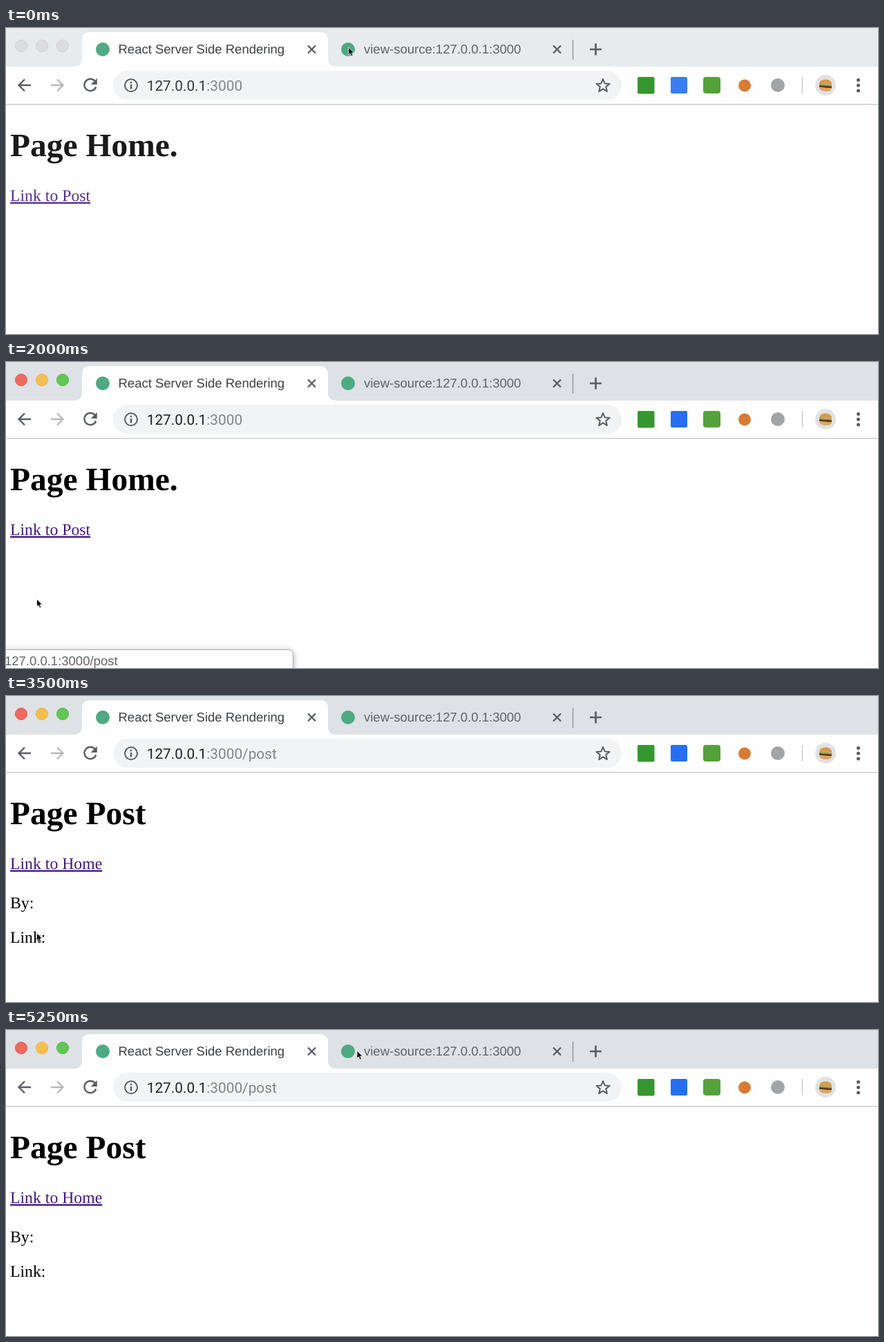
Animation of 1262 by 444 pixels, one loop 5500 ms. Source, as an HTML page:

```html
<!DOCTYPE html>
<html lang="en">
<head>
<meta charset="utf-8">
<title>Server side rendering demo</title>
<style>
  html, body { margin: 0; width: 100%; height: 100%; overflow: hidden; background: #fefefe; }
  svg { display: block; width: 1262px; height: 444px; text-rendering: geometricPrecision; }
  .ui { font: 18.5px "Liberation Sans", Arial, sans-serif; }
  .url { font: 20.8px Roboto, "Liberation Sans", sans-serif; }
  .page { font: 23.75px "Liberation Serif", "Times New Roman", serif; }
  .page .title { font-size: 47.5px; font-weight: bold; }
  .line { fill: none; stroke: #5a5e63; stroke-width: 2.4; }
</style>
</head>
<body>
<svg viewBox="0 0 1262 444">
  <defs>
    <filter id="shadow" x="-10%" y="-50%" width="120%" height="220%">
      <feDropShadow dx="0" dy="2" stdDeviation="5" flood-color="#000" flood-opacity=".3"/>
    </filter>
    <path id="cross" class="line" d="M-5.5-5.5 5.5 5.5M5.5-5.5-5.5 5.5"/>
    <path id="arrow" class="line" d="M9 0H-8M0-8.5-8.5 0 0 8.5"/>
  </defs>

  <rect width="1262" height="444" fill="#fefefe"/>
  <rect id="strip" width="1262" height="56"/>
  <path d="M98 56Q110 56 110 44V18Q110 6 122 6H454Q466 6 466 18V44Q466 56 478 56Z" fill="#fefefe"/>
  <g id="lights" stroke-width="1">
    <circle cx="22" cy="26" r="8.6"/>
    <circle cx="52" cy="26" r="8.6"/>
    <circle cx="82" cy="26" r="8.6"/>
  </g>

  <g class="ui">
    <circle id="icon" cx="140" cy="31" r="10" fill="#4fa982"/>
    <path id="spinner" fill="none" stroke="#7d80c4" stroke-width="2.6"/>
    <text id="tabTitle" x="162.5" y="37.3" fill="#3c4043"/>
    <circle cx="495" cy="31" r="10" fill="#4fa982"/>
    <text x="518" y="37.3" fill="#5f6368">view-source:127.0.0.1:3000</text>
  </g>
  <use href="#cross" x="442.5" y="31"/>
  <use href="#cross" x="797.5" y="31"/>
  <path d="M820.5 17V46" stroke="#95999e" stroke-width="1.5"/>
  <path class="line" d="M845 31H862M853.5 22.5V39.5" style="stroke-width:2.7"/>

  <path d="M0 110.8H1262" stroke="#d3d4d6" stroke-width="1.8"/>
  <use href="#arrow" x="27" y="83"/>
  <use href="#arrow" transform="translate(74 83) scale(-1 1)" opacity=".42"/>
  <g id="reload">
    <path class="line" d="M129 77.5A8.6 8.6 0 1 0 130.2 85.5"/>
    <path d="M131.8 73V82H122.8Z" fill="#5a5e63"/>
  </g>
  <path id="stop" class="line" d="M113.5 75 130 91.5M130 75 113.5 91.5"/>
  <rect x="155" y="62" width="736" height="42" rx="21" fill="#f1f3f5"/>
  <circle class="line" cx="181" cy="83.3" r="9" style="stroke-width:2"/>
  <path class="line" d="M181 82V88.5M181 77.8V80.2"/>
  <text class="url" x="203.7" y="90.6"><tspan id="host">127.0.0.1</tspan><tspan id="path" fill="#80858a"></tspan></text>
  <path id="star" class="line" stroke-linejoin="round" style="stroke-width:2"/>

  <rect x="914" y="71" width="24.5" height="24.5" rx="2" fill="#36962f"/>
  <rect id="blueIcon" x="962" y="71" width="24" height="24" rx="2"/>
  <rect x="1009" y="71" width="25" height="24" rx="4" fill="#55a13a"/>
  <circle cx="1069" cy="83.5" r="9" fill="#d77b36"/>
  <circle cx="1117" cy="83" r="10" fill="#a2a5a7"/>
  <path d="M1152.5 71V95" stroke="#cfd1d4" stroke-width="1.6"/>
  <circle cx="1186" cy="83" r="15" fill="#e2e2e3"/>
  <path d="M1177 81Q1178 74 1187 74.5Q1195 75 1195 82Z" fill="#d79a4b"/>
  <path d="M1177 82 1195 83.5" stroke="#8ba447" stroke-width="2"/>
  <path d="M1177 84.5 1195 86" stroke="#63391f" stroke-width="3"/>
  <path d="M1177 87H1195Q1195 92 1187 92 1178 92 1177 87Z" fill="#dba85e"/>
  <g fill="#5a5e63">
    <circle cx="1233.5" cy="75.5" r="2.5"/>
    <circle cx="1233.5" cy="83.3" r="2.5"/>
    <circle cx="1233.5" cy="91" r="2.5"/>
  </g>

  <g class="page" id="page">
    <text id="heading" class="title" x="6" y="186"></text>
    <text id="link" x="6" y="250.6" text-decoration="underline"></text>
    <g id="details">
      <text x="6" y="307.6">By:</text>
      <text x="6" y="358">Link:</text>
    </g>
  </g>

  <g id="status">
    <path d="M-4 417.5H409Q415.5 417.5 415.5 424V450H-4Z" fill="#fefefe" stroke="#a9a9a9" filter="url(#shadow)"/>
    <text id="statusText" class="ui" x="-2" y="439.5" fill="#5f6368"></text>
  </g>
  <path id="cursor" d="M0 0V11L2.5 8.7 4.4 13 6.4 12.1 4.6 8H8Z" fill="#000" stroke="#fff" stroke-width=".8"/>
</svg>

<script>
const LOOP = 5500;
const $ = id => document.getElementById(id);
const set = (id, attrs) => Object.entries(attrs).forEach(([k, v]) => $(id).setAttribute(k, v));
const show = (id, on) => set(id, { visibility: on ? 'visible' : 'hidden' });
const write = (id, text) => { if ($(id).textContent !== text) $(id).textContent = text; };

// Pointer stops: [time, x, y]
const pointer = [
  [0, 495.5, 28], [250, 499, 27], [500, 245, 278], [750, 199, 282],
  [1250, 93.5, 319.5], [1500, 50, 341], [1750, 44.5, 344],
  [4000, 50, 349], [4250, 62.5, 351], [4500, 157, 319],
  [4750, 458, 268], [5000, 500, 37], [5250, 508, 30]
];

// Status bubble: [time, text, opacity]
const statuses = [
  [0, '', 0], [2000, '127.0.0.1:3000/post', 1], [3250, '127.0.0.1:3000/post', 0.5],
  [3500, '', 0], [3750, '127.0.0.1:3000', 1], [4500, '', 0]
];

const at = (steps, t) => steps.reduce((last, step) => step[0] <= t ? step : last);

function arc(cx, cy, r, from, to) {
  const point = deg => {
    const a = deg * Math.PI / 180;
    return `${cx + r * Math.cos(a)} ${cy + r * Math.sin(a)}`;
  };
  return `M${point(from)}A${r} ${r} 0 0 1 ${point(to)}`;
}

function starPath(cx, cy, outer, inner) {
  const points = Array.from({ length: 10 }, (_, i) => {
    const a = (i / 5 - 0.5) * Math.PI, r = i % 2 ? inner : outer;
    return `${cx + r * Math.cos(a)} ${cy + r * Math.sin(a)}`;
  });
  return `M${points.join('L')}Z`;
}

function render(t) {
  const fading = t < 250;
  const active = t >= 1000;
  const pressed = t >= 2750 && t < 3000;
  const loading = t >= 3000 && t < 3500;
  const post = t >= 3250;

  set('strip', { fill: active ? '#dee1e6' : '#e7ebee' });
  const colors = active ? ['#ee6a5f', '#f5be50', '#62c655'] : ['#dddddf', '#dddddf', '#dddddf'];
  const edges = active ? ['#e5635a', '#ebb549', '#5abd4f'] : ['#d0d1d3', '#d0d1d3', '#d0d1d3'];
  [...$('lights').children].forEach((light, i) => {
    light.setAttribute('fill', colors[i]);
    light.setAttribute('stroke', edges[i]);
  });

  show('icon', !loading);
  show('spinner', loading);
  show('stop', loading);
  show('reload', !loading);
  set('spinner', { d: post ? arc(140, 31, 9, -60, 30) : arc(142, 31, 8.5, -100, -62) });
  write('tabTitle', loading && !post ? '127.0.0.1:3000/post' : 'React Server Side Rendering');
  write('path', t >= 3000 ? ':3000/post' : ':3000');
  set('host', { fill: fading ? '#34373a' : '#202124' });
  set('blueIcon', { fill: fading ? '#3b7df4' : '#246ff2' });

  set('page', { fill: fading ? '#1a1a1a' : '#000' });
  write('heading', post ? 'Page Post' : 'Page Home.');
  write('link', post ? 'Link to Home' : 'Link to Post');
  set('link', { fill: pressed ? '#ee0000' : fading ? '#55308a' : '#42197c' });
  show('details', post);

  const [, text, opacity] = at(statuses, t);
  write('statusText', text);
  set('status', { opacity });

  const [, x, y] = at(pointer, t);
  set('cursor', { transform: `translate(${x} ${y})` });
}

set('star', { d: starPath(864, 84, 10, 4.4) });
const start = performance.now();
function tick() {
  render((performance.now() - start) % LOOP);
  requestAnimationFrame(tick);
}
tick();
</script>
</body>
</html>
```
